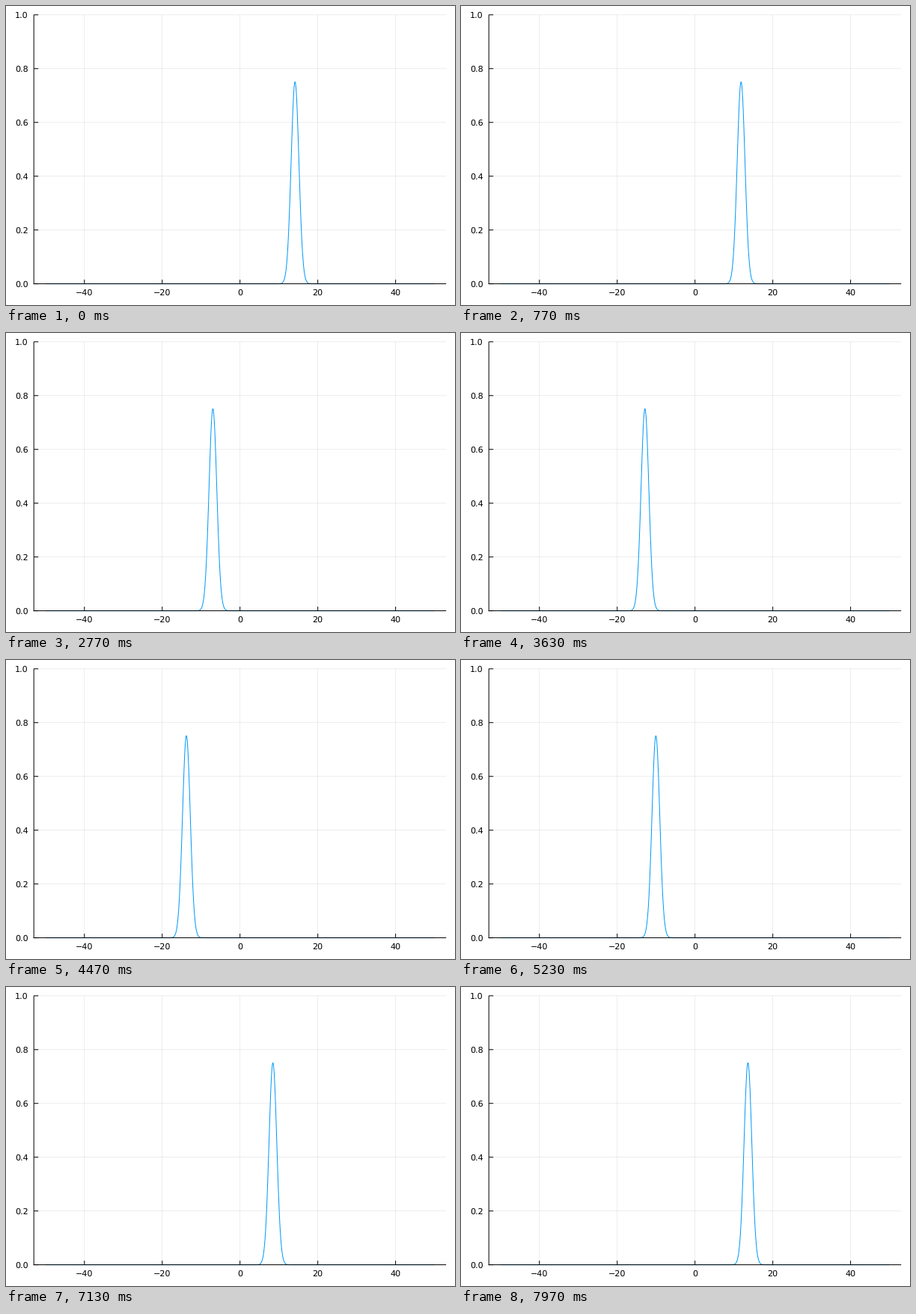
A matplotlib script for the animation above (8000 ms loop, 600 px wide and 400 px high).

```python
import numpy as np
import matplotlib.pyplot as plt
from matplotlib.animation import FuncAnimation

W, H, DPI = 600, 400, 100
FRAMES, LOOP_MS = 240, 8000
PERIOD = 250                      # frames per full oscillation
LEFT, RIGHT, TOP, BOTTOM = 37.2, 588.2, 11.8, 371.6
PX = 72 / DPI                     # points per pixel

plt.rcParams.update({
    "font.family": "DejaVu Sans",
    "font.size": 8,
    "text.hinting": "none",
    "path.simplify": False,
})


def sx(x):
    return LEFT + (x + 53) / 106 * (RIGHT - LEFT)


def sy(y):
    return BOTTOM - y * (BOTTOM - TOP)


fig = plt.figure(figsize=(W / DPI, H / DPI), dpi=DPI, facecolor="white")
ax = fig.add_axes([0, 0, 1, 1])
ax.set_xlim(0, W)
ax.set_ylim(H, 0)
ax.axis("off")


def line(xs, ys, color="black", width=1.0, z=3, **kw):
    return ax.plot(xs, ys, color=color, lw=width * PX, zorder=z,
                   solid_capstyle="butt", snap=False, **kw)[0]


# grid, ticks and labels
for v in range(-40, 41, 20):
    x = sx(v)
    line([x, x], [TOP, BOTTOM], alpha=0.1, width=0.7, z=1)
    line([x, x], [BOTTOM, BOTTOM - 5.5])
    ax.text(x, 387, str(v).replace("-", "\u2212"), ha="center", va="baseline")

for k in range(6):
    y = sy(k / 5)
    line([LEFT, RIGHT], [y, y], alpha=0.1, width=0.7, z=1)
    line([LEFT, LEFT + 6], [y, y])
    ax.text(29.5, y + 4.2, f"{k / 5:.1f}", ha="right", va="baseline")

line([LEFT, LEFT], [TOP, BOTTOM + 0.5])
line([LEFT - 0.5, RIGHT], [BOTTOM, BOTTOM])

# coherent state swinging in a harmonic well
grid = np.linspace(-50, 50, 1001)
curve = line(sx(grid), sy(0 * grid), color="#009AF9", z=2)


def update(i):
    center = 10 * np.sqrt(2) * np.cos(2 * np.pi * i / PERIOD)
    psi = np.pi ** -0.25 * np.exp(-(grid - center) ** 2 / 2)
    curve.set_ydata(sy(psi))
    return (curve,)


anim = FuncAnimation(fig, update, frames=FRAMES, interval=LOOP_MS / FRAMES,
                     init_func=lambda: update(0), repeat=True, repeat_delay=0)
plt.show()
```
